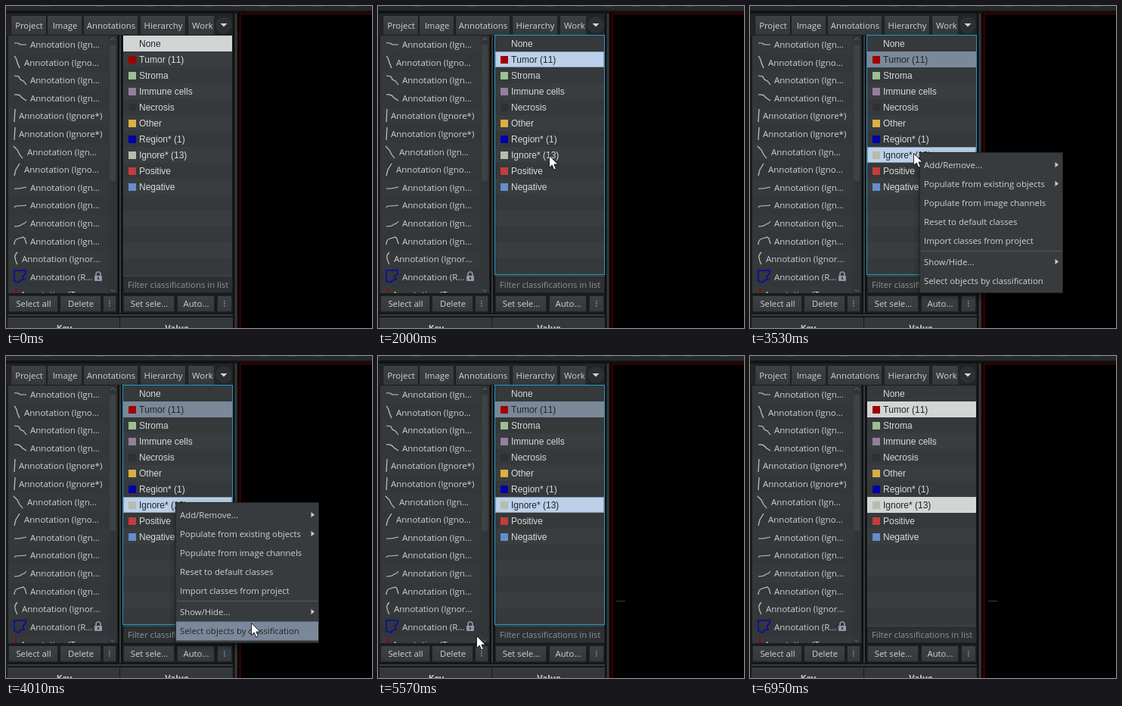
An HTML page that plays this animation: 484x425 px, repeating every 8 s.

```html
<!DOCTYPE html>
<html lang="en">
<head>
<meta charset="utf-8">
<title>Select objects by classification</title>
<style>
  html, body { margin: 0; width: 100%; height: 100%; overflow: hidden; background: #191b1c; }
  svg { display: block; width: 484px; height: 425px; }
  text { font: 11.35px "Open Sans", sans-serif; fill: #d0d2d4; white-space: pre; }
  .note { font-size: 11.5px; }
  .cls { font: 12px "Liberation Sans", Arial, sans-serif; font-kerning: none; fill: #d8dadb; }
  .mid { text-anchor: middle; }
  .head { font-weight: 700; }
  .hint { fill: #8e9194; }
  .dark { fill: #20252b; }
</style>
</head>
<body>
<svg id="stage" viewBox="0 0 484 425">
  <defs>
    <linearGradient id="btn" x2="0" y2="1">
      <stop offset="0" stop-color="#3d4144"/><stop offset="1" stop-color="#34383a"/>
    </linearGradient>
    <linearGradient id="hot" x2="0" y2="1">
      <stop offset="0" stop-color="#666b6f"/><stop offset="1" stop-color="#565b5f"/>
    </linearGradient>
    <clipPath id="listClip"><path d="M2 38H148V379H2Z"/></clipPath>
    <filter id="soft" x="-20%" y="-20%" width="140%" height="140%"><feGaussianBlur stdDeviation="4"/></filter>
  </defs>
</svg>
<script>
const LOOP = 8000, TICK = 70;
const stage = document.getElementById('stage');

function add(tag, attrs, parent = stage) {
  const el = document.createElementNS('http://www.w3.org/2000/svg', tag);
  for (const k in attrs) el.setAttribute(k, attrs[k]);
  parent.appendChild(el);
  return el;
}
const box = (x, y, w, h, fill, parent, extra) =>
  add('rect', { x, y, width: w, height: h, fill, ...extra }, parent);
const line = (d, stroke, parent, w = 1) =>
  add('path', { d, stroke, fill: 'none', 'stroke-width': w }, parent);
const shape = (d, fill, parent) => add('path', { d, fill }, parent);
function label(str, x, mid, cls = '', parent) {
  const el = add('text', { x, y: mid + 4, class: cls }, parent);
  el.textContent = str;
  return el;
}
const show = (el, on) => el.setAttribute('visibility', on ? 'visible' : 'hidden');

// Window frame and toolbar edge
box(0, 0, 484, 6, '#25282a');
box(0, 6, 484, 4, '#121314');
for (const x of [47, 119, 185, 222, 261, 298, 336, 371, 407, 452]) box(x, 0, 11, 1, '#3a3e40');
box(1, 10, 299, 29, '#222426');

// Tabs
for (const [name, x, w] of [['Project', 6, 47], ['Image', 54, 46], ['Annotations', 102, 72],
  ['Hierarchy', 177, 60], ['Work', 240, 36]]) {
  const cut = name === 'Work';
  box(x + .5, 12.5, w, 26, 'url(#btn)', stage, { stroke: '#1b1d1e' });
  label(name, cut ? 246 : x + w / 2 + 1, 25.5, cut ? '' : 'mid');
}
box(275, 10, 25, 28, '#222426');
add('circle', { cx: 288, cy: 25, r: 11, fill: '#2d3032' });
shape('M283.5 23H292.5L288 27.5Z', '#d5d7d8');

// Annotation list
box(2.5, 38.5, 145, 341, '#35393b', stage, { stroke: '#1b1d1e' });
const list = add('g', { 'clip-path': 'url(#listClip)' });
const notes = [
  [32, 'Ign...', 'M11 49Q16 48 19 51H27'],
  [24, 'Igno...', 'M11 66Q14 69 15 75L18 82'],
  [32, 'Ign...', 'M11 92L17 93L19 97L23 99L27 104'],
  [32, 'Ign...', 'M11 117Q18 116 21 121L27 125'],
  [17, 'Ignore*)', 'M12 136L11 153'],
  [17, 'Ignore*)', 'M12 160L11 177'],
  [28, 'Ign...', 'M10 185L15 190L18 196L22 201'],
  [24, 'Igno...', 'M18 208L13 216L11 224'],
  [32, 'Ign...', 'M11 241H17L27 239'],
  [32, 'Ign...', 'M11 266Q12 263 16 264L27 263'],
  [32, 'Ign...', 'M11 291Q19 291 21 288Q24 288 27 284'],
  [32, 'Ign...', 'M11 315Q11 308 16 307L23 305L25 307L27 314'],
  [21, 'Ignor...', 'M15 325Q11 329 12 333Q13 338 15 341'],
  [32, 'R...', ''],
  [19, 'Tumor...', '']
];
notes.forEach(([x, tail, d], i) => {
  const mid = Math.round(51 + i * 23.6);
  if (i % 2) box(3, mid - 12, 133, 24, '#333739', list);
  label('Annotation (' + tail, x, mid, 'note', list);
  line(d, '#c2c8bc', list, 1.2);
});
line('M11 349H26V353L22 357L24 361L19 362L17 365L11 363Z', '#0a0aa8', list, 1.6);
line('M13 372V380', '#a00000', list, 2);
box(117, 356, 10, 7, '#9a93a8', list, { rx: 1 });
line('M119 357V354Q119 351 122 351Q125 351 125 354V357', '#9a93a8', list, 1.6);
box(121, 358, 2, 3, '#3b3e42', list);
box(136, 39, 11, 340, '#313537');
box(137, 51, 8, 180, '#3d4143', stage, { rx: 2 });
line('M138 45L141 42L144 45M138 374L141 377L144 374', '#6a6e70');

// Class list
box(154.5, 38.5, 145, 316, '#35393b', stage, { stroke: '#1b1d1e' });
for (let i = 0; i < 15; i += 2) box(155, 60 + i * 21, 144, 21, '#393d3f');
const classes = [
  ['None'], ['Tumor (11)', '#a00000'], ['Stroma', '#9dbf92'], ['Immune cells', '#94809a'],
  ['Necrosis', '#303030'], ['Other', '#dcae45'], ['Region* (1)', '#0000a8'],
  ['Ignore* (13)', '#b8bcae'], ['Positive', '#c43c3c'], ['Negative', '#668ccc']
].map(([name, color], i) => {
  const mid = 50 + i * 21;
  const bar = box(155, mid - 11, 144, 21, 'none');
  const rim = box(155.5, mid - 10.5, 143, 20, 'none', stage, { stroke: '#8296b0' });
  if (color) box(162, mid - 5, 10, 10, color);
  return { bar, rim, text: label(name, 176, mid, 'cls') };
});
const focusRing = box(154.5, 38.5, 145, 316, 'none', stage, { stroke: '#2099cc' });

box(155.5, 358.5, 144, 20, '#2e3133', stage, { stroke: '#222526' });
label('Filter classifications in list', 161, 368, 'hint');

// Buttons
const buttons = {};
for (const [name, x, w] of [['Select all', 3, 66], ['Delete', 71, 55], ['', 128, 18],
  ['Set sele...', 155, 68], ['Auto...', 226, 50], ['', 279, 20]]) {
  const b = box(x + .5, 382.5, w - 1, 21, 'url(#btn)', stage, { stroke: '#202324' });
  if (name) {
    buttons[name] = b;
    label(name, x + w / 2 + .5, 393, 'mid');
  } else for (const y of [389, 392, 395]) box(x + w / 2 - 1, y, 1.6, 1.6, '#5d9ad2');
}

// Splitters and property table
line('M151 39V405', '#0f1011', stage, 6);
line('M151 39V405', '#393d3f', stage, 2);
box(1, 405, 300, 6, '#141617');
line('M2 408H300', '#393d3f', stage, 2);
box(2, 411, 148, 14, '#34383a');
box(151, 411, 149, 14, '#34383a');
label('Key', 77, 424.5, 'mid head');
label('Value', 226, 424.5, 'mid head');
box(300, 10, 8, 415, '#0f1011');
line('M304 10V425', '#34383a', stage, 3);

// Viewer
box(307, 9, 177, 416, '#000');
line('M309.5 425V10.5H484', '#780000');
const trace = line('M315 323.5H327', '#3b403d');

// Context menu
const menu = add('g', {});
box(224, 196, 190, 188, '#000', menu, { opacity: .45, filter: 'url(#soft)' });
box(224.5, 193.5, 189, 185, '#373b3d', menu, { stroke: '#232627' });
line('M226 323.5H413', '#565a5c', menu);
const items = [['Add/Remove...', 210, 1], ['Populate from existing objects', 235, 1],
  ['Populate from image channels', 260], ['Reset to default classes', 285],
  ['Import classes from project', 310], ['Show/Hide...', 338, 1],
  ['Select objects by classification', 363]].map(([name, mid, more]) => {
  const bar = box(225, mid - 12.5, 188, 25, '#7a8899', menu);
  if (more) shape(`M403.5 ${mid - 4}L408 ${mid - .5}L403.5 ${mid + 3}Z`, '#c9cbcc', menu);
  return { bar, mid, text: label(name, 230, mid, '', menu) };
});
const submenu = add('g', {});
box(414.5, 325.5, 120, 57, '#373b3d', submenu, { stroke: '#232627' });
label('Show classes in viewer', 420, 341.5, '', submenu);
label('Hide classes in viewer', 420, 366.5, '', submenu);

// Pointer
const pointer = add('g', {});
const halo = add('circle', { cx: -1, cy: .5, r: 12, fill: '#d8c82e', opacity: .8 }, pointer);
add('path', { d: 'M.5 .5V16.5L4.2 13L6.8 19L9.4 17.9L6.9 12H12Z', fill: '#fff', stroke: '#111',
  'stroke-width': .9 }, pointer);

// Waypoints: time, x, y
const choose = [
  [130, 364, 369], [480, 240, 170], [620, 160, 85], [690, 166, 59], [820, 190, 62],
  [950, 196, 66], [1090, 203, 69], [1300, 203, 69], [1730, 228, 186], [1860, 227, 192],
  [1980, 226, 197], [2070, 226, 198], [2200, 226, 196], [2600, 226, 196], [2720, 224, 193],
  [3320, 224, 193], [3440, 212, 189], [3500, 216, 194], [3560, 216, 194], [3660, 325, 338],
  [3800, 325, 338], [4200, 324, 364], [4410, 325, 364], [4740, 322, 361], [5370, 322, 361]
];
const remove = [
  [5440, 290, 365], [5510, 190, 370], [5580, 85, 368], [5650, 47, 366], [5850, 88, 397],
  [5980, 88, 397], [6150, 93, 401], [6550, 93, 401], [6800, 102, 381], [6875, 102, 381],
  [6880, 373, 315]
];
const route = choose.concat(remove);
const clicks = [[1090, 1300], [2070, 2200], [2990, 3130], [5100, 5170], [6390, 6530]];
const within = (t, a, b) => t >= a && t < b;

function pointerAt(t) {
  const i = route.findIndex(p => p[0] > t);
  if (i < 0) return route[route.length - 1].slice(1);
  if (i === 0) return route[0].slice(1);
  const [t0, x0, y0] = route[i - 1], [t1, x1, y1] = route[i];
  const k = (t - t0) / (t1 - t0);
  return [Math.round(x0 + (x1 - x0) * k), Math.round(y0 + (y1 - y0) * k)];
}

function paintRow(row, fill, rim) {
  row.bar.setAttribute('fill', fill || 'none');
  row.text.classList.toggle('dark', !!fill);
  show(row.rim, rim);
}

function draw(t) {
  const visible = within(t, 130, 6950);
  const [x, y] = pointerAt(Math.floor(t / TICK) * TICK + 20);
  pointer.setAttribute('transform', `translate(${x} ${y})`);
  show(pointer, visible);
  show(halo, visible && clicks.some(([a, b]) => within(t, a, b)));

  const focused = within(t, 1090, 6460), both = t >= 2130;
  const plain = '#d3d4d4', active = '#bcd0e9', passive = '#7a8899';
  classes.forEach((row, i) => {
    const chosen = i === 0 ? t < 1090 : i === 1 ? t >= 1090 : i === 7 && both;
    const current = focused && i === (both ? 7 : 1);
    paintRow(row, chosen && (!focused ? plain : current ? active : passive), current);
  });
  show(focusRing, focused);

  const open = within(t, 3060, 5170);
  let sub = false;
  show(menu, open);
  items.forEach((item, i) => {
    const on = open && x > 225 && x < 413 && Math.abs(y - item.mid) < 12.5;
    show(item.bar, on);
    item.text.classList.toggle('dark', on);
    if (on && i === 5) sub = true;
  });
  show(submenu, sub);
  show(trace, t >= 5170);

  const over = visible && x > 71 && x < 126 && y > 382 && y < 404;
  buttons.Delete.setAttribute('fill', over ? 'url(#hot)' : 'url(#btn)');
}

const start = performance.now();
function frame() {
  draw((performance.now() - start) % LOOP);
  requestAnimationFrame(frame);
}
frame();
</script>
</body>
</html>
```
